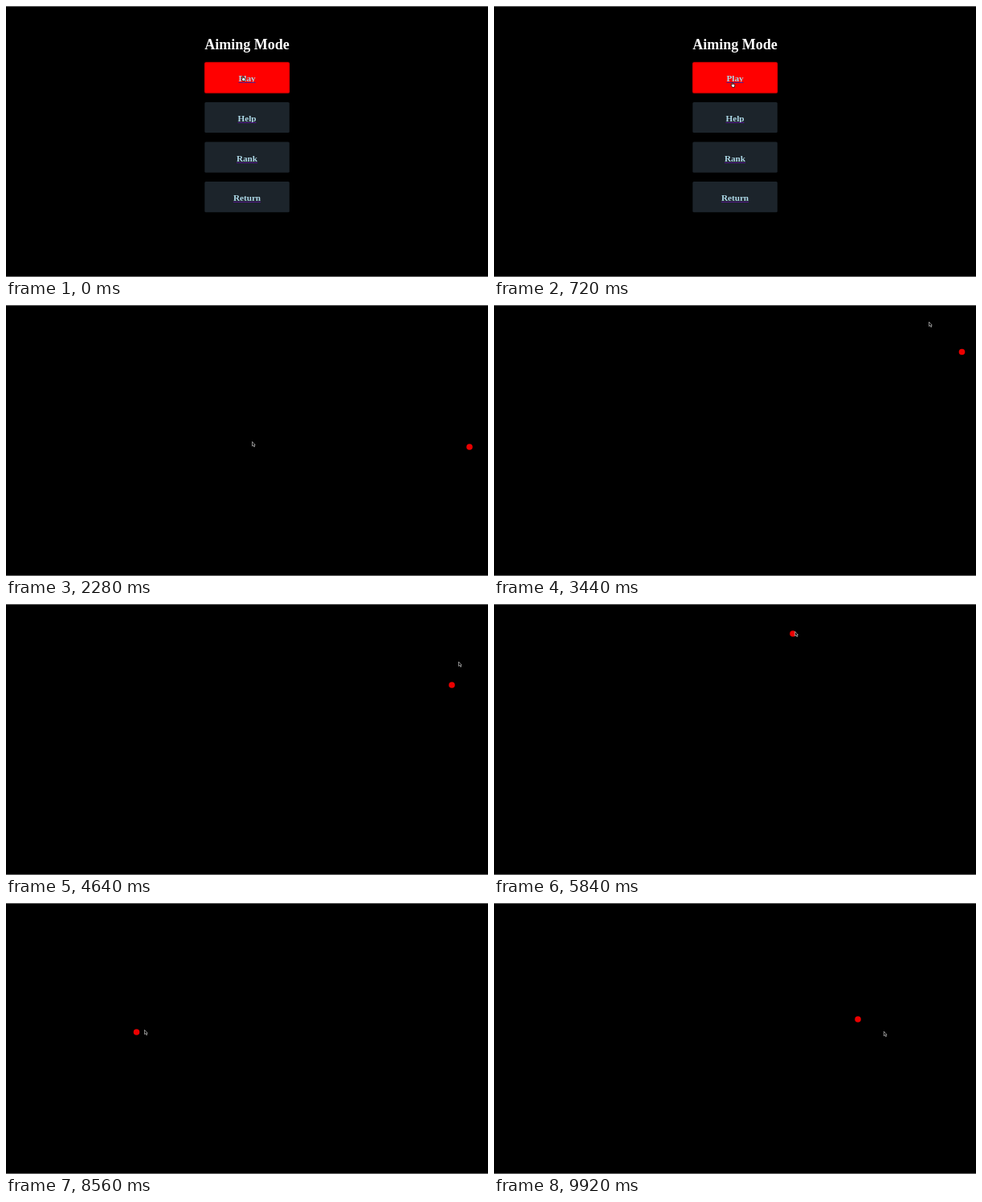
Recreate the animation shown at these times as an HTML page with a canvas. Size 600x338 px, loop 9960 ms.

```html
<!DOCTYPE html>
<html lang="en">
<head>
<meta charset="utf-8">
<title>Aiming Mode</title>
<style>
  html, body { margin: 0; width: 100%; height: 100%; overflow: hidden; background: #000; }
  canvas { display: block; width: 600px; height: 338px; }
</style>
</head>
<body>
<canvas id="stage" width="600" height="338"></canvas>
<script>
const ctx = document.getElementById('stage').getContext('2d');
const LOOP = 9960, STEP = 40;
const REACTION = 160, FLICK = 280, SETTLE = 150;
const SERIF = '"Liberation Serif", "Times New Roman", serif';

// Each ball stays until it is hit, when the next one appears.
// missX and missY: how far the first flick of the mouse lands off the ball.
const ball = (time, x, y, missX = 0, missY = 0) => ({ time, x, y, missX, missY });
const balls = [
  ball(1040, 304, 173, 12, 0),
  ball(2200, 577, 177),
  ball(2640, 505, 16),
  ball(3200, 582.5, 58.5, 1, 34),
  ball(4320, 555, 101),
  ball(5120, 372, 37, 6, -4),
  ball(6120, 509.5, 219, 11, 14),
  ball(7320, 113, 140),
  ball(7900, 162.5, 161, 64, -2),
  ball(9440, 453, 145, 32, 19)
];
const MENU_END = balls[0].time;
const menuStart = { x: 293, y: 87 }, menuRest = { x: 296, y: 99 };

const clamp = u => Math.min(1, Math.max(0, u));
const mix = (a, b, k) => a + (b - a) * k;

// Where the cursor tip comes to rest on a ball
const restOn = b => ({ x: b.x + 2, y: b.y - 3 });

// Wait, flick along a quarter ellipse, then settle from the miss onto the ball
function cursorAt(t, index) {
  if (index < 0) {
    const k = clamp((t - 120) / (MENU_END - 120));
    return { x: mix(menuStart.x, menuRest.x, k), y: mix(menuStart.y, menuRest.y, k) };
  }
  const target = balls[index], rest = restOn(target);
  const from = index ? restOn(balls[index - 1]) : menuRest;
  const moving = t - target.time - REACTION;
  const angle = clamp(moving / FLICK) * Math.PI / 2;
  const error = Math.exp(-((Math.max(0, moving - FLICK) / SETTLE) ** 2));
  return {
    x: mix(from.x, rest.x + target.missX * error, Math.sin(angle)),
    y: mix(from.y, rest.y + target.missY * error, 1 - Math.cos(angle))
  };
}

function drawText(text, baseline, size, color) {
  ctx.font = `bold ${size}px ${SERIF}`;
  ctx.textAlign = 'center';
  ctx.fillStyle = color;
  ctx.fillText(text, 300, baseline);
  return ctx.measureText(text).width;
}

function drawMenu() {
  drawText('Aiming Mode', 54, 18, '#fff');
  ['Play', 'Help', 'Rank', 'Return'].forEach((label, i) => {
    const y = 70.3 + i * 49.6, hovered = i === 0;
    ctx.save();
    if (hovered) {
      ctx.shadowColor = '#f00a';
      ctx.shadowBlur = 2;
    }
    ctx.fillStyle = hovered ? '#f00' : '#1c242b';
    ctx.beginPath();
    ctx.roundRect(247.3, y, 105.5, 38.2, 1.5);
    ctx.fill();
    ctx.restore();
    const width = drawText(label, y + 24, 11.2, '#add8e6');
    ctx.fillStyle = '#551a8b';
    ctx.fillRect(300 - width / 2, Math.round(y + 25), width, 1);
  });
}

function drawBall({ x, y }) {
  ctx.fillStyle = '#eb0000';
  ctx.beginPath();
  ctx.arc(x, y, 3.8, 0, Math.PI * 2);
  ctx.fill();
}

const arrow = new Path2D('M.5 .5V6L1.8 4.9 2.8 7 3.7 6.6 2.8 4.6H4.2Z');
const hand = new Path2D('M1.3 .5V3.6L.4 3.2 0 3.8 1.6 6.5H4.4L5 3.2 2.3 2.5V.5Z');

function drawCursor({ x, y }, shape, fill, outline) {
  ctx.save();
  ctx.translate(x, y);
  ctx.fillStyle = fill;
  ctx.strokeStyle = outline;
  ctx.lineWidth = .7;
  ctx.fill(shape);
  ctx.stroke(shape);
  ctx.restore();
}

function draw(t) {
  ctx.fillStyle = '#000';
  ctx.fillRect(0, 0, 600, 338);
  ctx.fillStyle = '#666';
  ctx.fillRect(0, 0, 600, 1);
  ctx.fillRect(0, 337, 600, 1);

  const index = balls.filter(b => b.time <= t).length - 1;
  const cursor = cursorAt(t, index);
  if (index < 0) {
    drawMenu();
    drawCursor(cursor, hand, '#fff', '#000');
  } else {
    drawBall(balls[index]);
    drawCursor(cursor, arrow, '#000', '#c4c4c4');
  }
}

const start = performance.now();
function tick() {
  const t = (performance.now() - start) % LOOP;
  draw(Math.floor(t / STEP) * STEP);
  requestAnimationFrame(tick);
}
tick();
</script>
</body>
</html>
```
